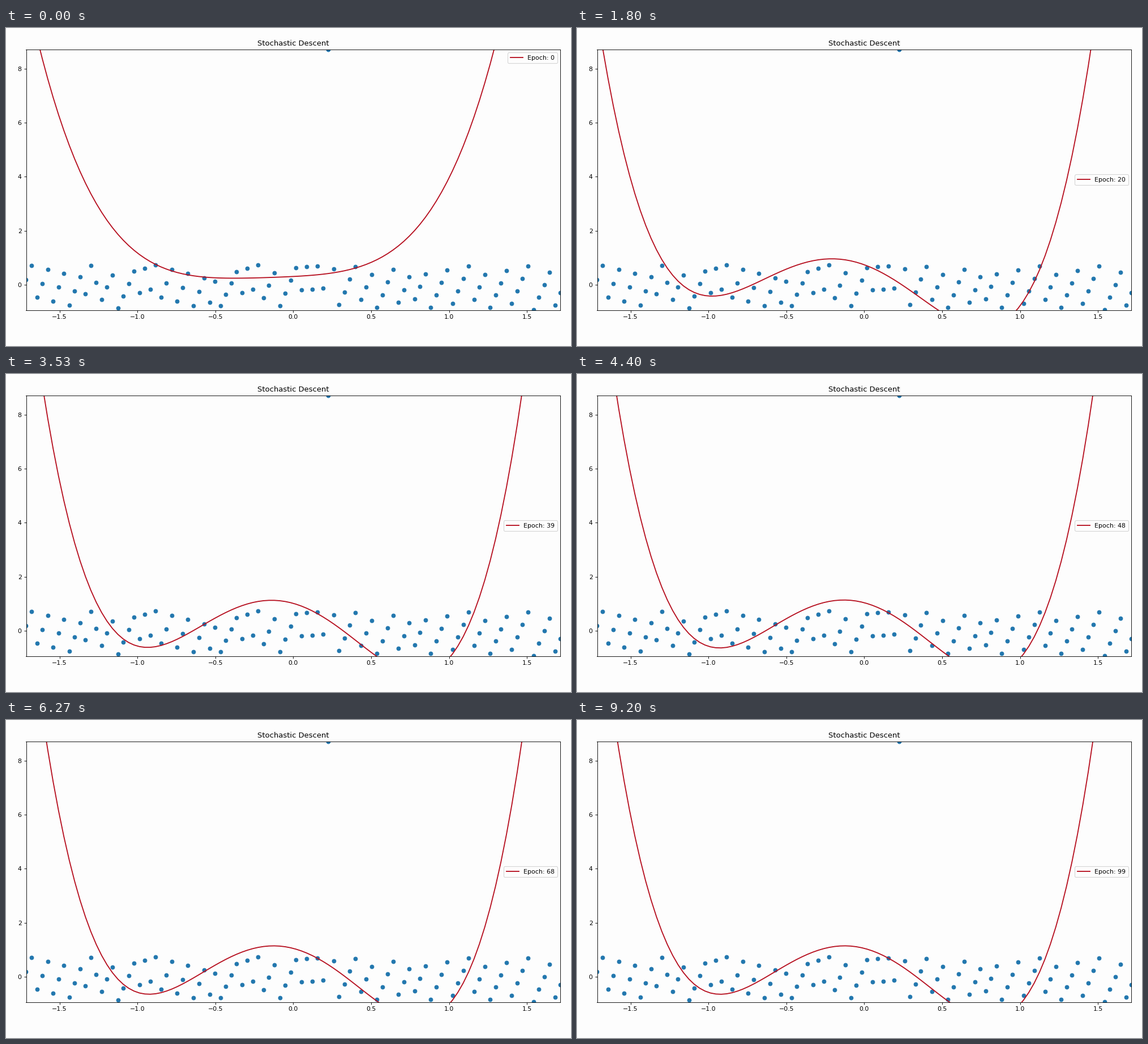
Recreate the animation shown at these times as a matplotlib script. Size 998x561 px, loop 9230 ms.

```python
import numpy as np
import matplotlib.pyplot as plt
from matplotlib.animation import FuncAnimation

W, H, DPI = 998, 561, 80
LOOP_MS, FRAMES, EPOCHS = 9230, 278, 100
PAPER, BLUE, RED = "#fdfdfd", "#2277ae", "#b60f1f"
Y_MIN, Y_MAX = -0.937, 8.715

plt.rcParams.update({
    "font.family": "DejaVu Sans",
    "font.size": 9.875,
    "figure.facecolor": PAPER,
    "axes.facecolor": PAPER,
})


def standard_samples(n=100, span=80.5, step=22, unit=47.6, outlier=56):
    """Evenly spaced x; y climbs by a fixed step, wraps, and slips in phase."""
    i = np.arange(n)
    at = [0, 10, 14, 20, 24, 33, 36, 39, 43, 50, 55, 58, 71, 72, 93, 94]
    slip = [4, 30, 144, 142, 226, 247, 293, 287, 372, 374, 469, 455, 459, 479, 477, 459]
    raw = (49.5 + step * i + np.interp(i, at, slip)) % span
    y = Y_MIN + raw / unit
    y[outlier] = Y_MAX
    return (i - i.mean()) / i.std(), y


x, y = standard_samples()

# Quartic weights (constant term first) at a few epochs of the descent
RATE = 0.11
key_epochs = np.array([0, 12, 28, 99])
key_weights = np.array([
    [0.305, 0.298, 0.508, 1.092, 1.752],
    [0.289, -2.470, -3.177, 2.412, 2.717],
    [0.927, -1.935, -5.358, 1.700, 3.652],
    [1.051, -1.488, -5.815, 1.266, 3.961],
])


def progress(epoch):
    return 1 - np.exp(-RATE * epoch)


def curve(epoch):
    u, keys = progress(epoch), progress(key_epochs)
    weights = [np.interp(u, keys, col) for col in key_weights.T]
    return np.polynomial.polynomial.polyval(x, weights)


fig = plt.figure(figsize=(W / DPI, H / DPI), dpi=DPI)
left, right, top, bottom = 35.5, 979.2, 38, 497.5
ax = fig.add_axes([left / W, 1 - bottom / H, (right - left) / W, (bottom - top) / H])
ax.set_title("Stochastic Descent")
ax.scatter(x, y, color=BLUE)
line, = ax.plot(x, curve(0), color=RED, lw=1.65, label="Epoch: 0")
ax.set_xlim(x.min(), x.max())
ax.set_ylim(Y_MIN, Y_MAX)
legend = ax.legend(loc="best")
label = legend.get_texts()[0]


def update(i):
    last = FRAMES - 2  # the final epoch is held for two frames
    epoch = -(-min(i, last) * (EPOCHS - 1) // last)  # rounded up
    line.set_ydata(curve(epoch))
    label.set_text(f"Epoch: {epoch}")
    return line, legend


anim = FuncAnimation(fig, update, frames=FRAMES, interval=LOOP_MS / FRAMES,
                     repeat=True, repeat_delay=0)
plt.show()
```
